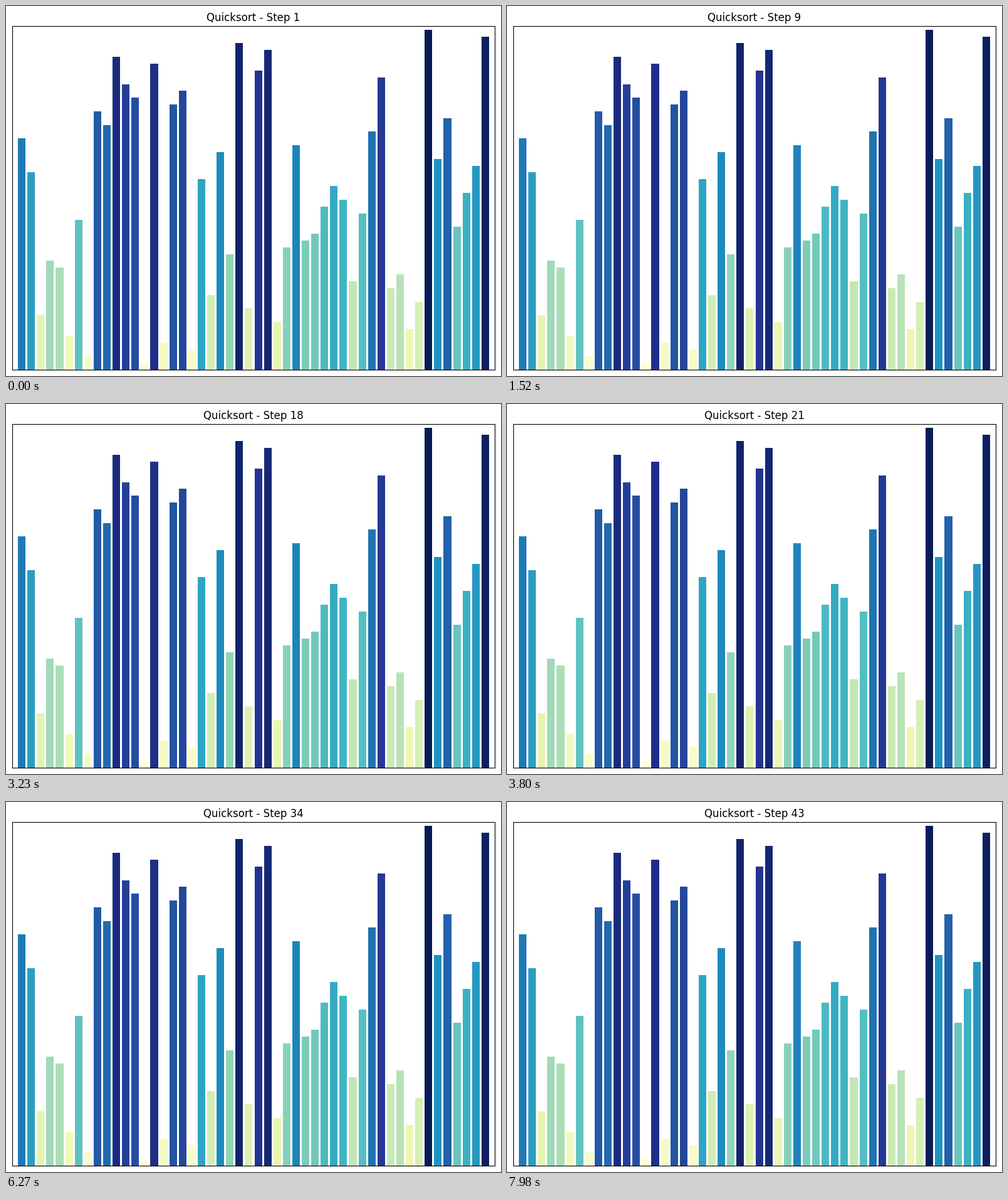
Animation of 790x590 px, one loop 8000 ms. Source, as a matplotlib script:

```python
import matplotlib.pyplot as plt
import numpy as np
from matplotlib.animation import FuncAnimation
from matplotlib.collections import PolyCollection

W, H, DPI = 790, 590, 100
MARGIN, TITLE_SPACE = 10, 32 + 1 / 3
LOOP_MS, TICK_MS, STEP_MS = 8000, 10, 190
BAR_WIDTH = 0.8

# The unsorted input: a shuffle of 1 to 50.
VALUES = np.array([
    34, 29, 8, 16, 15, 5, 22, 2, 38, 36, 46, 42, 40, 1, 45, 4, 39,
    41, 3, 28, 11, 32, 17, 48, 9, 44, 47, 7, 18, 33, 19, 20, 24, 27,
    25, 13, 23, 35, 43, 12, 14, 6, 10, 50, 31, 37, 21, 26, 30, 49])
COUNT = len(VALUES)


def bar(i, value):
    x0, x1 = i - BAR_WIDTH / 2, i + BAR_WIDTH / 2
    return [(x0, 0), (x1, 0), (x1, value), (x0, value)]


def step_at(tick):
    return tick * TICK_MS // STEP_MS + 1


plt.rcParams["font.family"] = "DejaVu Sans"
fig = plt.figure(figsize=(W / DPI, H / DPI), dpi=DPI, facecolor="white")
ax = fig.add_axes([MARGIN / W, MARGIN / H,
                   1 - 2 * MARGIN / W, 1 - (MARGIN + TITLE_SPACE) / H])
ax.set(xlim=(-1, COUNT), ylim=(0, COUNT * 1.01), xticks=[], yticks=[])

# A single collection keeps every redraw cheap.
ax.add_collection(PolyCollection(
    [bar(i, v) for i, v in enumerate(VALUES)],
    facecolors=plt.get_cmap("YlGnBu")(VALUES / COUNT),
    edgecolors="none", linewidths=0))
title = ax.set_title("", fontsize=12, pad=6)


def update(tick):
    title.set_text(f"Quicksort - Step {step_at(tick)}")
    return (title,)


anim = FuncAnimation(fig, update, frames=LOOP_MS // TICK_MS, interval=TICK_MS,
                     repeat=True, repeat_delay=0, blit=False)
plt.show()
```
